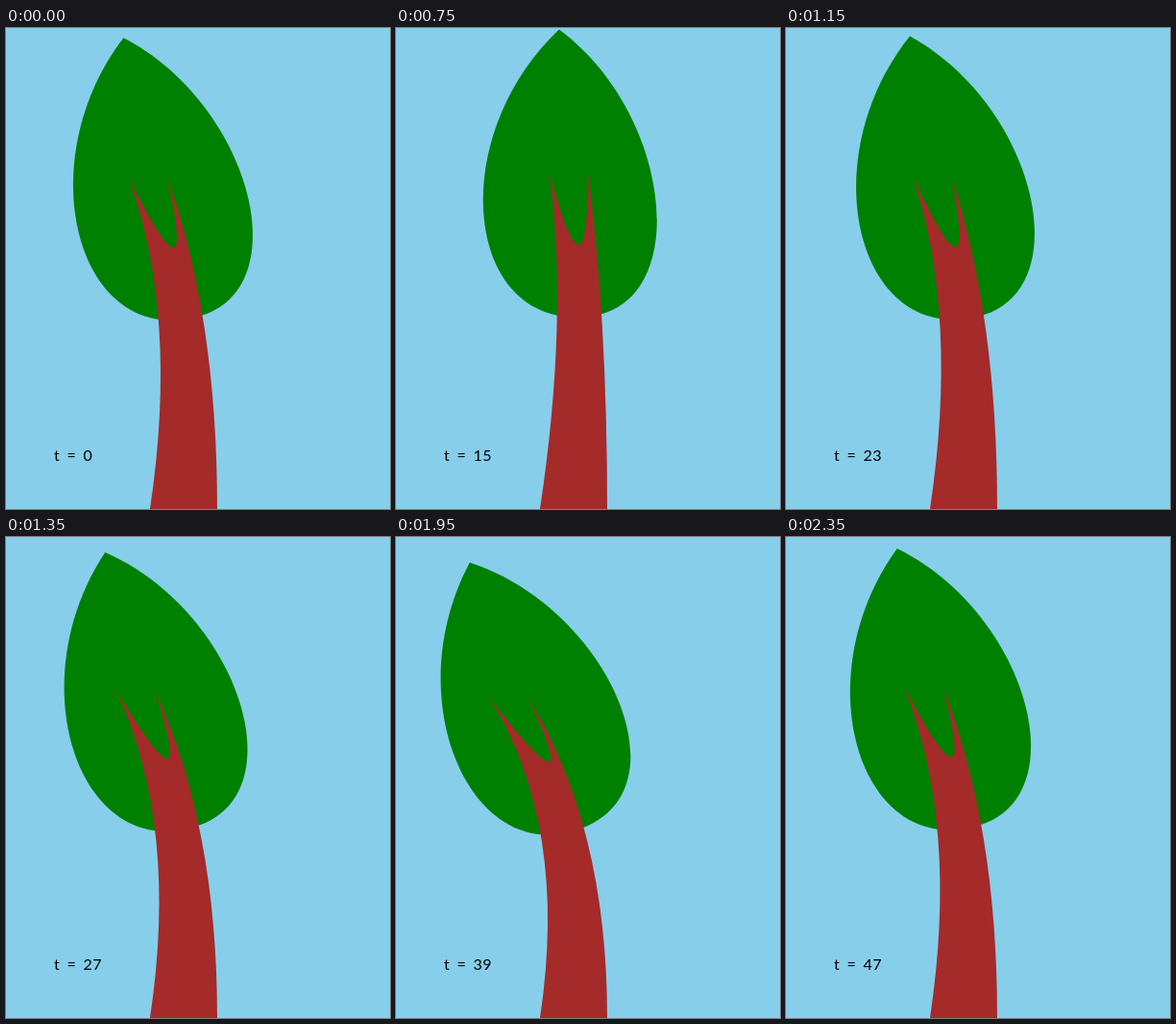
An HTML page that plays this animation: 400x500 px, repeating every 2400 ms.

```html
<!DOCTYPE html>
<html lang="en">
<head>
<meta charset="utf-8">
<title>Swaying tree</title>
<style>
  html, body { margin: 0; width: 100%; height: 100%; overflow: hidden; background: #87ceeb; }
  svg { display: block; width: 400px; height: 500px; }
  text { font: 16px Lato, "Open Sans", sans-serif; letter-spacing: .45px; word-spacing: 2.8px; }
</style>
</head>
<body>
<svg viewBox="0 0 400 500">
  <rect width="400" height="500" fill="#87ceeb"/>
  <path id="crown" fill="#008000" d="M200 0C70 100 70 300 200 300C310 300 310 100 200 0Z"/>
  <path id="trunk" fill="#a52a2a"/>
  <text id="label" x="50" y="450" xml:space="preserve"></text>
</svg>
<script>
  const STEP = 50, COUNT = 48;
  const [crown, trunk, label] = ['crown', 'trunk', 'label'].map(id => document.getElementById(id));
  let shown = -1;

  function draw(t) {
    const deg = -15 + 10 * Math.sin(2 * Math.PI * t / COUNT);
    const rad = deg * Math.PI / 180;
    // Both branch tips swing on a 200px arm
    const dx = 200 * Math.sin(rad);
    const y = 350 - 200 * Math.cos(rad);
    crown.setAttribute('transform', `rotate(${deg} 200 300)`);
    trunk.setAttribute('d',
      `M150 500Q180 300 ${180 + dx} ${y}Q200 300 ${220 + dx} ${y}Q220 300 220 500Z`);
    label.textContent = `t = ${t}`;
  }

  const start = performance.now();
  function tick(now) {
    const t = Math.floor(Math.max(0, now - start) / STEP) % COUNT;
    if (t !== shown) draw(shown = t);
    requestAnimationFrame(tick);
  }
  tick(start);
</script>
</body>
</html>
```
